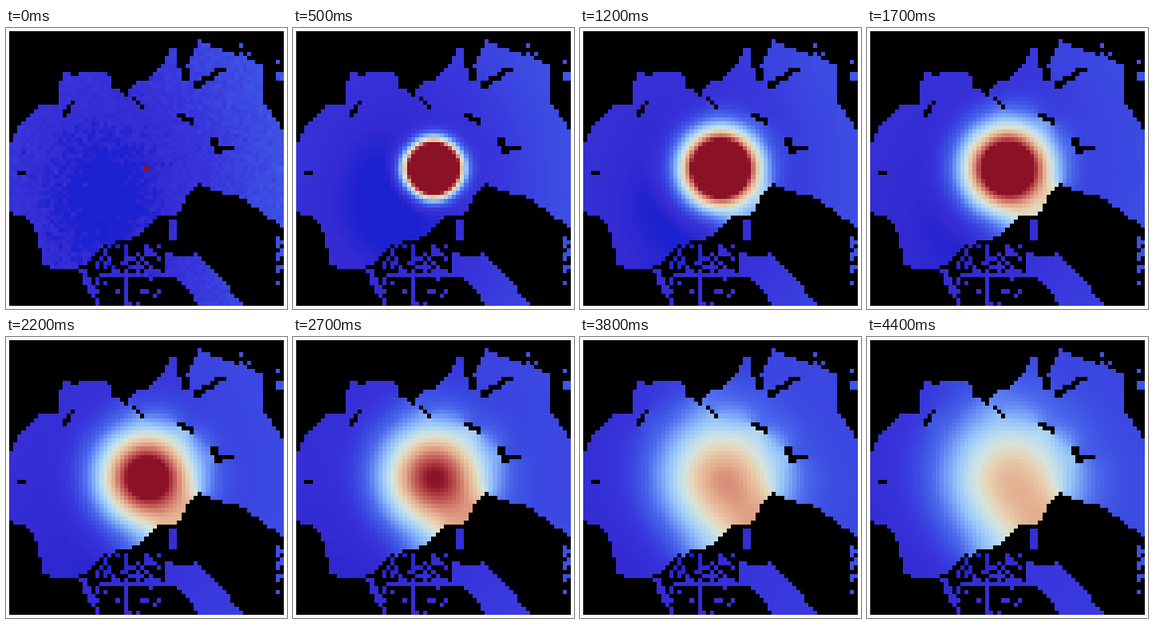
Recreate the animation shown at these times as a matplotlib script. Size 352x352 px, loop 4500 ms.

```python
import numpy as np
import matplotlib.pyplot as plt
from matplotlib.animation import FuncAnimation
from matplotlib.colors import LinearSegmentedColormap
from matplotlib.path import Path

SIZE, BORDER, DPI = 352, 4, 100
N = 67                    # cells per side
FRAMES, INTERVAL = 45, 100
RATE = 0.173              # share of heat exchanged per step
STEPS = 8                 # steps per frame once under way
HEAT = 418                # heat released in the centre cell

# Shorelines as (column, row) key points
MAINLAND = [(0, 28), (2, 23.5), (5, 20), (8, 18), (12.5, 17.5), (11.5, 13),
            (14, 9.7), (16, 12), (18.5, 9.5), (24, 9.5), (25.5, 13.7),
            (28.5, 16), (30, 13), (34, 11.3), (38, 8), (39, 4.5), (41, 4),
            (41.7, 11.5), (44.5, 11.7), (43.5, 8.5), (46, 2.3), (49, 3.5),
            (57.5, 6.2), (62, 8.2), (62, 17), (67, 24.5), (67, 48.3),
            (57.5, 41), (50.5, 39), (46.5, 37), (43.5, 39.5), (41, 44.8),
            (36, 45.2), (31.5, 50.2), (23, 52.2), (18.3, 57.3), (13, 58.6),
            (8.5, 57), (6, 47), (3.5, 44.8), (0, 44.3)]
SOUTH = [(38.5, 53.5), (42, 55.5), (46, 54.3), (50.5, 58.6), (57, 67),
         (46, 67), (43.5, 62.5), (38, 58.6)]

# Strokes: start, end, half width
SPITS = [((22.5, 59.5), (38.5, 59.5), .6), ((40, 46.5), (40, 50.5), .7),
         ((28.5, 61), (28.5, 66), .5), ((18, 58), (20, 64), .7)]
LAKES = [((2.5, 34.5), (3.5, 34.5), .3), ((15.3, 17.5), (13.5, 20.5), .6),
         ((30.5, 16.5), (32.5, 18.5), .4), ((41.5, 20.5), (44.5, 22), .5),
         ((45.5, 13.3), (52, 9.3), .7), ((49.8, 26.5), (51, 29), .9),
         ((51, 29), (54.5, 28.3), .6)]

# Scattered islets: columns, rows, density
ISLETS = [((21, 37), (52, 59), .45), ((17, 37), (60, 67), .2),
          ((65, 67), (50, 62), .6), ((65, 67), (7, 12), .5),
          ((20, 26), (7, 9), .2), ((47, 60), (3, 6), .2)]

STOPS = [(0, (26, 34, 208)), (.02, (30, 34, 208)), (.035, (52, 43, 210)),
         (.07, (56, 54, 220)), (.12, (62, 82, 228)), (.17, (76, 104, 236)),
         (.25, (115, 155, 246)), (.33, (150, 196, 250)), (.42, (186, 220, 240)),
         (.5, (214, 228, 220)), (.58, (232, 212, 180)), (.7, (228, 172, 142)),
         (.8, (208, 120, 105)), (.92, (178, 62, 70)), (1, (139, 18, 38))]

rng = np.random.default_rng(4)
row, col = np.mgrid[:N, :N] + .5


def inside(shore):
    centres = np.column_stack([col.ravel(), row.ravel()])
    path = Path(shore + shore[:1], closed=True)
    return path.contains_points(centres).reshape(N, N)


def near(start, end, width):
    (x0, y0), (x1, y1) = start, end
    dx, dy = x1 - x0, y1 - y0
    s = ((col - x0) * dx + (row - y0) * dy) / (dx * dx + dy * dy)
    s = np.clip(s, 0, 1)
    return np.hypot(col - x0 - s * dx, row - y0 - s * dy) <= width


def build_land():
    land = inside(MAINLAND) | inside(SOUTH)
    for (c0, c1), (r0, r1), density in ISLETS:
        land[r0:r1, c0:c1] |= rng.random((r1 - r0, c1 - c0)) < density
    for spit in SPITS:
        land |= near(*spit)
    for lake in LAKES:
        land &= ~near(*lake)
    return land


def initial_heat():
    basin = np.hypot(col - 23, .75 * (row - 41))
    u = .01 + .0028 * np.maximum(basin - 5, 0)
    u = np.maximum(u + rng.normal(0, .008, u.shape), 0)
    u[N // 2, N // 2] += HEAT
    return u


def diffuse(u, land):
    """One explicit step; no heat crosses the shoreline."""
    flow_v = RATE * np.diff(u, axis=0) * (land[1:] & land[:-1])
    flow_h = RATE * np.diff(u, axis=1) * (land[:, 1:] & land[:, :-1])
    u = u.copy()
    u[:-1] += flow_v
    u[1:] -= flow_v
    u[:, :-1] += flow_h
    u[:, 1:] -= flow_h
    return u


def steps_at(i):
    """Total steps done by frame i, with a slow start."""
    return round(STEPS * i * i / (i + 2))


land = build_land()
states = [initial_heat()]
for i in range(1, FRAMES):
    u = states[-1]
    for _ in range(steps_at(i) - steps_at(i - 1)):
        u = diffuse(u, land)
    states.append(u)

cmap = LinearSegmentedColormap.from_list(
    "heat", [(v, tuple(c / 255 for c in rgb)) for v, rgb in STOPS], N=512)
cmap.set_bad("black")

fig = plt.figure(figsize=(SIZE / DPI, SIZE / DPI), dpi=DPI, facecolor="white")
edge = BORDER / SIZE
ax = fig.add_axes([edge, edge, 1 - 2 * edge, 1 - 2 * edge])
ax.axis("off")
image = ax.imshow(np.ma.masked_where(~land, states[0]), cmap=cmap, vmin=0,
                  vmax=1, interpolation="nearest", aspect="auto")


def update(i):
    image.set_data(np.ma.masked_where(~land, states[i]))
    return [image]


anim = FuncAnimation(fig, update, frames=FRAMES, interval=INTERVAL,
                     repeat=True, repeat_delay=0, blit=False)
plt.show()
```
